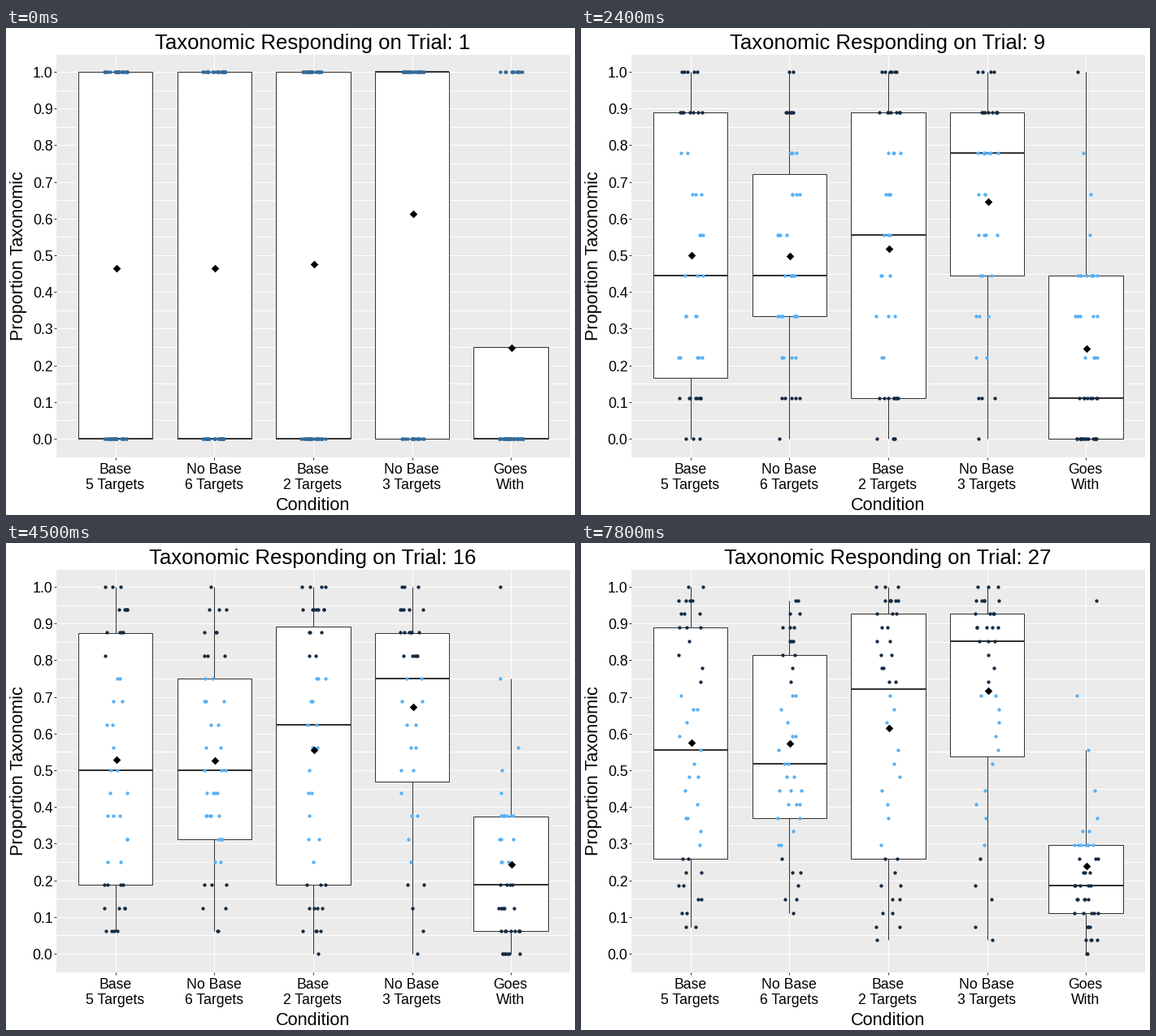
Recreate the animation shown at these times as a matplotlib script. Size 700 by 600 pixels, loop 8000 ms.

```python
import math

import matplotlib.pyplot as plt
import numpy as np
from matplotlib.animation import FuncAnimation
from matplotlib.collections import LineCollection
from matplotlib.patches import Rectangle

PT = 0.72  # points per pixel at 100 dpi
INK = "#333333"
DARK, MID, LIGHT = "#132B43", "#336A98", "#56B1F7"
SPACING = 121.53
CENTERS = 134.92 + SPACING * np.arange(5)
HALF_BOX = 0.375 * SPACING

# Each spread holds the lower quartile, median and upper quartile of a group.
KEY_TRIALS = (4, 7, 27)


def group(label, size, mean, spreads, low=0, high=1, tail=1):
    return dict(label=label, size=size, mean=mean, spreads=np.array(spreads),
                low=low, high=high, tail=tail)


GROUPS = [
    group("Base\n5 Targets", 43, (.467, .578),
          [(.25, .5, .75), (.143, .429, .857), (.259, .556, .889)], low=.074),
    group("No Base\n6 Targets", 43, (.466, .575),
          [(.125, .25, .75), (.286, .429, .714), (.37, .519, .815)], low=.111, high=.963),
    group("Base\n2 Targets", 44, (.477, .618),
          [(0, .5, 1), (.143, .571, .893), (.259, .722, .926)], low=.037),
    group("No Base\n3 Targets", 39, (.616, .719),
          [(.25, .75, 1), (.429, .714, .857), (.537, .852, .926)], low=.037),
    group("Goes\nWith", 44, (.25, .241),
          [(0, .25, .25), (0, .143, .429), (.111, .185, .306)], high=.963, tail=5),
]


def to_y(share):
    return 506 - 452 * np.asarray(share)


def mean_at(g, trial):
    return np.interp(trial, (1, 27), g["mean"])


def counts_at(g, trial):
    """Number of taxonomic answers of every participant, in rising order."""
    rank = np.linspace(0, 1, g["size"])
    if trial == 1:
        return (rank > 1 - mean_at(g, 1)).astype(int)
    q1, median, q3 = (np.interp(trial, KEY_TRIALS, q) for q in g["spreads"].T)
    low = g["low"] * trial / 27
    high = 1 + (g["high"] - 1) * trial / 27
    share = np.interp(rank, (0, .25, .5, .75), (low, q1, median, q3))
    upper = np.clip(4 * rank - 3, 0, 1) ** g["tail"]
    return np.round((share + (high - q3) * upper) * trial).astype(int)


def box_stats(shares):
    q1, median, q3 = np.quantile(shares, (.25, .5, .75))
    reach = 1.5 * (q3 - q1)
    inside = shares[(shares >= q1 - reach) & (shares <= q3 + reach)]
    return inside.min(), q1, median, q3, inside.max()


def dot_color(count, trial):
    """Dark where a two-sided binomial test differs from chance."""
    if trial < 6:
        return MID
    tail = range(min(count, trial - count) + 1)
    p = sum(math.comb(trial, k) for k in tail) / 2 ** (trial - 1)
    return DARK if p < 0.05 else LIGHT


fig = plt.figure(figsize=(7, 6), dpi=100, facecolor="white")
ax = fig.add_axes([0, 0, 1, 1])
ax.set(xlim=(0, 700), ylim=(600, 0))
ax.axis("off")


def write(x, y, text, size, ha="center", va="baseline", rotation=0):
    return ax.text(x, y, text, fontsize=size * PT, family="Liberation Sans",
                   color="black", ha=ha, va=va, rotation=rotation)


def rule(xs, ys, color):
    ax.plot(xs, ys, color=color, lw=PT, solid_capstyle="butt", zorder=1)


ax.add_patch(Rectangle((62, 33), 632, 496, fc="#EBEBEB", lw=0, zorder=0))
for n in range(21):
    y = to_y(n / 20)
    rule([62, 694], [y, y], "white")
    if n % 2 == 0:
        rule([59, 62], [y, y], INK)
        write(57.5, y + 7, f"{n / 20:.1f}", 17.6, ha="right")
for x, g in zip(CENTERS, GROUPS):
    rule([x, x], [33, 529], "white")
    rule([x, x], [529, 532], INK)
    for row, line in enumerate(g["label"].split("\n")):
        write(x - 0.5, 549 + 19 * row, line, 17.6)
write(378, 594.5, "Condition", 21.6)
write(16, 280.5, "Proportion Taxonomic", 21.6, va="center", rotation=90)
title = write(377, 26, "", 25.7)

whiskers = ax.add_collection(LineCollection([], colors=INK, linewidths=PT, zorder=2))
medians = ax.add_collection(LineCollection([], colors=INK, linewidths=2 * PT, zorder=4))
boxes = [ax.add_patch(Rectangle((x - HALF_BOX, 0), 2 * HALF_BOX, 1, fc="white",
                                ec=INK, lw=PT, zorder=3)) for x in CENTERS]
dots = ax.scatter([], [], s=(4.3 * PT) ** 2, linewidths=0, zorder=5)
diamonds = ax.scatter([], [], s=(6.8 * PT) ** 2, marker="D", color="black",
                      linewidths=0, zorder=6)


def update(frame):
    trial = frame // 3 + 1
    rng = np.random.default_rng(trial)
    title.set_text(f"Taxonomic Responding on Trial: {trial}")
    stems, middles, points, colors, means = [], [], [], [], []
    for x, g, box in zip(CENTERS, GROUPS, boxes):
        counts = counts_at(g, trial)
        shares = counts / trial
        low, q1, median, q3, high = to_y(box_stats(shares))
        box.set_y(q3)
        box.set_height(q1 - q3)
        stems += [[(x, q3), (x, high)], [(x, q1), (x, low)]]
        middles.append([(x - HALF_BOX, median), (x + HALF_BOX, median)])
        jitter = rng.uniform(-15, 15, g["size"])
        points += zip(np.round(x + jitter) + 0.5, np.round(to_y(shares)) + 0.5)
        colors += [dot_color(int(c), trial) for c in counts]
        means.append((round(x) + 0.5, np.round(to_y(mean_at(g, trial))) + 0.5))
    whiskers.set_segments(stems)
    medians.set_segments(middles)
    dots.set_offsets(points)
    dots.set_facecolors(colors)
    diamonds.set_offsets(means)
    return [title, whiskers, medians, dots, diamonds, *boxes]


anim = FuncAnimation(fig, update, frames=80, interval=100, repeat=True,
                     repeat_delay=0, blit=False)
plt.show()
```
